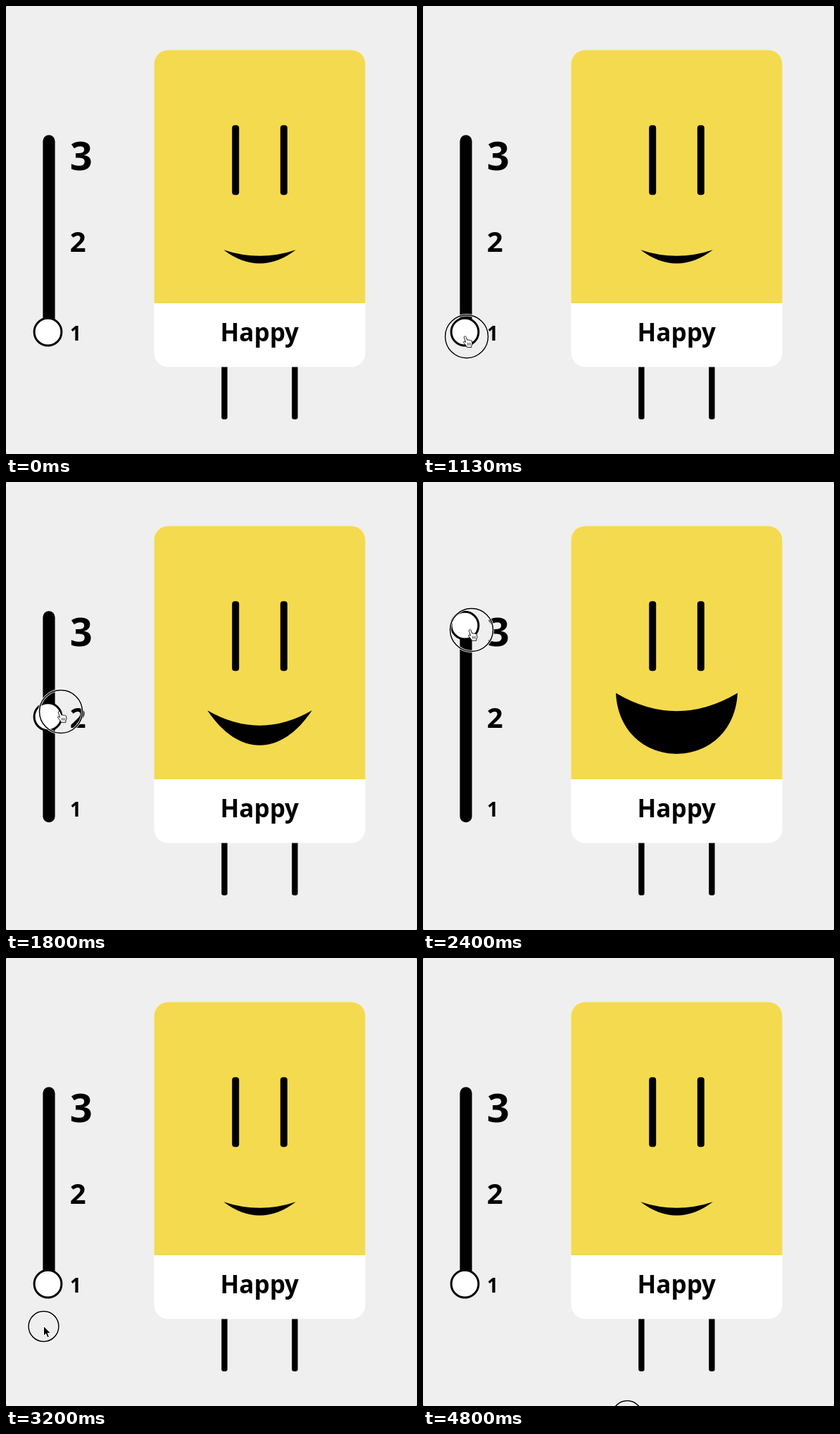
Write an HTML page that moves like this. It is 584x636 px and loops after 4.87 s.

```html
<!DOCTYPE html>
<html lang="en">
<head>
<meta charset="utf-8">
<title>Happiness slider</title>
<style>
  html, body { margin: 0; width: 100%; height: 100%; overflow: hidden; background: #777; }
  svg { display: block; width: 100%; height: 100%; }
  text { font-family: "Noto Sans", "Open Sans", sans-serif; font-weight: 700; }
</style>
</head>
<body>
<svg viewBox="0 0 584 636">
  <rect width="584" height="636" rx="2" fill="#efefef"/>

  <rect x="306.2" y="500" width="8.4" height="86.7" rx="3"/>
  <rect x="406.2" y="500" width="8.4" height="86.7" rx="3"/>
  <rect x="210.5" y="62.5" width="300" height="450" rx="20" fill="#fff"/>
  <path d="M210.5 422V82.5a20 20 0 0 1 20-20h260a20 20 0 0 1 20 20V422z" fill="#f4da4f"/>
  <rect x="321.2" y="169.2" width="10" height="99" rx="4"/>
  <rect x="389.8" y="169.2" width="10" height="99" rx="4"/>
  <path id="mouth"/>
  <text x="360.3" y="475.5" font-size="35" text-anchor="middle">Happy</text>

  <rect x="52.4" y="183.2" width="17.2" height="300" rx="8.5"/>
  <text x="90.7" y="233" font-size="56">3</text>
  <text x="90.7" y="348.6" font-size="40">2</text>
  <text x="91" y="475" font-size="28">1</text>
  <circle id="knob" cx="59.5" r="19.4" fill="#fff" stroke="#000" stroke-width="3"/>

  <g id="cursor">
    <g fill="none">
      <circle class="ring" stroke="#fff" stroke-opacity=".85" stroke-width="3.4"/>
      <circle class="ring" stroke="#000" stroke-width="1.5"/>
    </g>
    <path id="arrow" d="M0-.5V13.5L3.2 10.6 5.4 15.8 7.9 14.7 5.7 9.7H10z" fill="#000" stroke="#fff"/>
    <g id="hand" transform="translate(-1 -1) scale(.9)" stroke="#000" stroke-linejoin="round">
      <path d="M-3 2.5Q-3 .6-1.6 .6T.4 2.3L1.8 6.6Q3.6 5.6 4.6 7 6.2 6 7.2 7.4 9 6.8 9.5 8.6L10 13 8.7 15.5V18H1.6L.6 16-3.2 11.3Q-4.4 9.5-3.1 9T-.4 10.4z" fill="#fff"/>
      <path d="M2.6 11V15M4.8 11V15M7 11V15" stroke-width=".8"/>
    </g>
  </g>
</svg>
<script>
const LOOP = 4870, STEP = 1000 / 15;
const $ = id => document.getElementById(id);
const rings = document.querySelectorAll('.ring');
const clamp = v => Math.max(0, Math.min(1, v));
const ease = v => 1 - (1 - clamp(v)) ** 2;
const mix = (a, b, k) => a + (b - a) * k;
// Smooth curve through the values at levels 0, 1 and 2
const bend = (a, b, c, l) => a + (b - a) * l + (c - 2 * b + a) * l * (l - 1) / 2;

// Pointer stops: time, x, y
const STOPS = [
  [70, -24, 560], [530, 63, 458], [870, 63, 458], [1130, 62, 470],
  [1400, 65, 410], [1800, 78, 326], [2400, 69, 210], [2930, 57, 484], [3200, 53.5, 523]
];

function pointerAt(t) {
  // Peeks in over the bottom edge before the loop restarts
  if (t > 4200) return [282 + (t - 4310) / 60, 664 - 14 * Math.cos((t - 4310) / 490 * 2 * Math.PI)];
  const i = Math.max(1, STOPS.findLastIndex(s => s[0] <= t) + 1);
  const a = STOPS[i - 1], b = STOPS[i] || a;
  const k = clamp((t - a[0]) / (b[0] - a[0] || 1));
  return [mix(a[1], b[1], k), mix(a[2], b[2], k)];
}

function mouthPath(level) {
  const w = bend(51.3, 74.3, 86.5, level);
  const y = bend(346.3, 324.3, 299.6, level);
  const top = bend(354.8, 345.7, 325.3, level);
  const low = bend(365.5, 373.8, 386, level);
  const inset = bend(34, 44, 6, level);
  const l = 360.5 - w, r = 360.5 + w, cy = y + (low - y) / 0.75;
  return `M${l} ${y}Q360.5 ${2 * top - y} ${r} ${y}C${r - inset} ${cy} ${l + inset} ${cy} ${l} ${y}Z`;
}

function draw(t) {
  const [x, y] = pointerAt(t);
  // The knob snaps on as the pointer passes halfway between levels
  const level = ease((398 - y) / 25) + ease((268 - y) / 25);
  $('mouth').setAttribute('d', mouthPath(level));
  $('knob').setAttribute('cy', mix(462.7, 203.7, level / 2));

  const hand = t > 925 && t < 3050;
  const press = ease((t - 900) / 130) - ease((t - 2960) / 200);
  const shown = t > 60 && t < 3460 || t > 4200;
  $('cursor').setAttribute('transform', `translate(${x} ${y})`);
  $('cursor').setAttribute('visibility', shown ? 'visible' : 'hidden');
  $('hand').style.display = hand ? '' : 'none';
  $('arrow').style.display = hand ? 'none' : '';
  rings.forEach(c => c.setAttribute('r', mix(21.4, 30.5, press)));
}

function frame() {
  const t = performance.now() % LOOP;
  draw(Math.floor((t + 4) / STEP) * STEP);
  requestAnimationFrame(frame);
}
frame();
</script>
</body>
</html>
```
